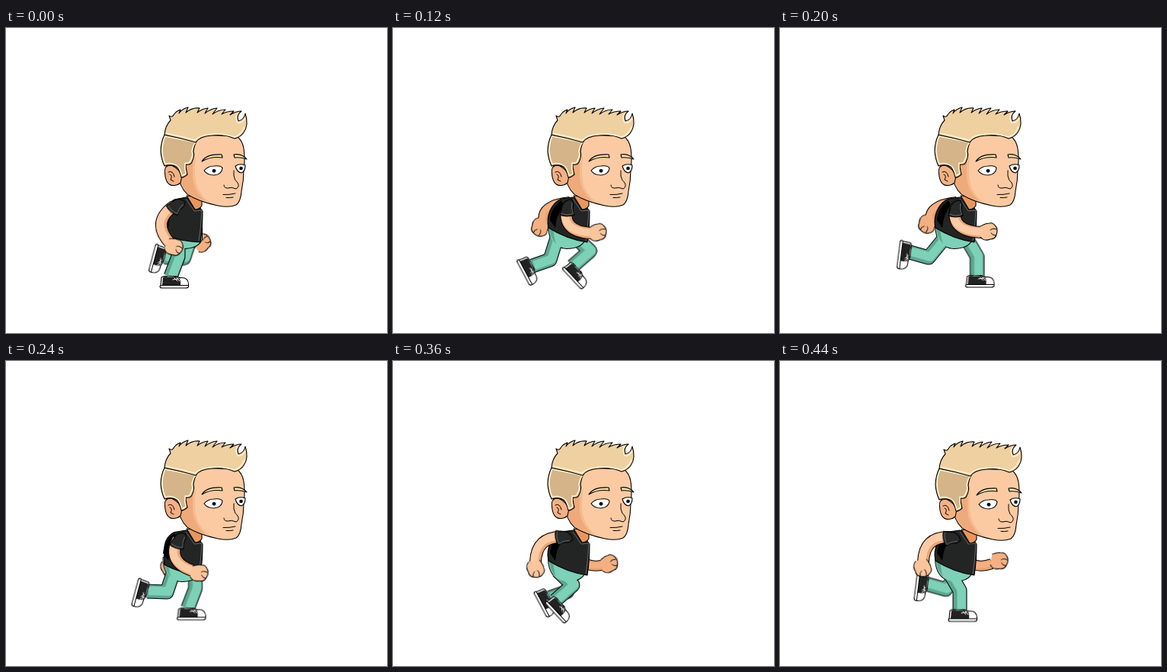
Write an HTML page without scripts that moves like this. It is 500 px wide and 400 px high and loops after 480 ms.

```html
<!DOCTYPE html>
<html lang="en">
<head>
<meta charset="utf-8">
<title>Run cycle</title>
<style>
html, body { margin: 0; width: 100%; height: 100%; overflow: hidden; background: #fff; }
svg { display: block; width: 500px; height: 400px; }
path { stroke-linejoin: round; }
.ink { stroke: #000; stroke-width: 1.1; }
.line { fill: none; stroke: #000; stroke-width: 1; stroke-linecap: round; }
.seam { fill: none; stroke: #6d706f; stroke-width: .9; }
.glow { fill: none; stroke: #fff0d2; stroke-width: 1.6; }

/* Limbs are one animated centre line stroked three times: edge, shade, light */
.leg, .arm { fill: none; }
.leg { stroke-width: 17; stroke: #5da690; }
.arm { stroke-width: 14; stroke: #eda473; }
.leg.edge { stroke-width: 19; stroke: #000; }
.arm.edge { stroke-width: 16; stroke: #000; }
.leg.light { stroke-width: 11.5; stroke: #7dd1b7; transform: translate(2.2px, -.8px); }
.arm.light { stroke-width: 10; stroke: #fbcba6; transform: translate(-1.4px, -.6px); }
.fist { fill: #fbc59c; }
.far .arm { stroke-width: 12; stroke: #eda473; }
.far .arm.edge { stroke-width: 14; stroke: #000; }
.far .arm.light { stroke-width: 7; stroke: #f3b183; }
.far .fist { fill: #f3b183; }

/* Legs share one cycle, half a period apart */
.leg, .shoe { animation: leg .48s step-end infinite; }
.shoe { animation-name: shoe; }
.far .leg, .far .shoe { animation-delay: -.24s; }
.head { animation: bob .48s step-end infinite; }
.arm, .hand, .sleeve, .shirt, .pelvis { animation: arm .48s steps(2) infinite; }
.hand { animation-name: hand; }
.far .arm { animation-name: far-arm; }
.far .hand { animation-name: far-hand; }
.sleeve { animation-name: sleeve; }
.shirt { animation-name: shirt; }
.pelvis { animation-name: pelvis; }

@keyframes leg {
  0%, 100% { d: path("M226 274L226 300L216 326"); }
  8.33% { d: path("M221 276L217 304L206 323"); }
  16.66% { d: path("M215 272L213 298L201 320"); }
  25% { d: path("M216 272L206 304L183 312"); }
  33.33% { d: path("M217 273L200 304L177 304"); }
  41.66% { d: path("M218 273L195 301L170 294"); }
  50% { d: path("M220 276L211 303L185 302"); }
  58.33% { d: path("M217 276L214 309L191 313"); }
  66.66% { d: path("M219 276L222 297L203 311"); }
  75% { d: path("M216 275L236 294L213 314"); }
  83.33% { d: path("M218 276L238 297L228 320"); }
  91.66% { d: path("M219 272L236 301L236 327"); }
}
@keyframes shoe {
  0%, 100% { transform: translate(221px, 333px); }
  8.33% { transform: translate(208px, 330px) rotate(14deg); }
  16.66% { transform: translate(198px, 327.5px) rotate(32deg); }
  25% { transform: translate(178px, 318px) rotate(62deg); }
  33.33% { transform: translate(169px, 308px) rotate(82deg); }
  41.66% { transform: translate(163.5px, 298px) rotate(97deg); }
  50% { transform: translate(177px, 305px) rotate(105deg); }
  58.33% { transform: translate(186px, 318px) rotate(85deg); }
  66.66% { transform: translate(200px, 322.5px) rotate(58deg); }
  75% { transform: translate(218px, 325.5px) rotate(47deg); }
  83.33% { transform: translate(231px, 330px) rotate(18deg); }
  91.66% { transform: translate(240px, 333.5px); }
}
@keyframes arm {
  0%, 100% { d: path("M221 233Q190 254 215 282"); }
  16.66% { d: path("M223 234Q214 267 246 280"); animation-timing-function: step-end; }
  25% { d: path("M229 234Q220 267 260 269"); }
  41.66% { d: path("M231 234Q222 267 266 268"); }
  58.33% { d: path("M220 233Q199 261 226 283"); }
  75% { d: path("M222 231Q188 230 187 264"); }
  91.66% { d: path("M222 231Q189 230 188 264"); animation-timing-function: step-end; }
}
@keyframes hand {
  0%, 100% { transform: translate(220px, 287px) rotate(25deg); }
  16.66% { transform: translate(253px, 281px) rotate(10deg); animation-timing-function: step-end; }
  25% { transform: translate(268px, 268px) rotate(-5deg); }
  41.66% { transform: translate(273px, 267px) rotate(0deg); }
  58.33% { transform: translate(233px, 289px) rotate(25deg); }
  75% { transform: translate(187px, 272px) rotate(80deg); }
  91.66% { transform: translate(187px, 271px) rotate(80deg); animation-timing-function: step-end; }
}
@keyframes far-arm {
  0%, 100% { d: path("M236 236Q232 274 251 283"); }
  16.66% { d: path("M232 230Q194 238 203 262"); animation-timing-function: step-end; }
  25%, 41.66% { d: path("M232 228Q193 232 198 254"); }
  58.33% { d: path("M234 234Q222 262 234 279"); }
  75% { d: path("M240 236Q242 276 278 267"); }
  91.66% { d: path("M240 236Q242 278 278 266"); animation-timing-function: step-end; }
}
@keyframes far-hand {
  0%, 100% { transform: translate(257px, 282px) rotate(-35deg); }
  16.66% { transform: translate(200px, 267px) rotate(100deg); animation-timing-function: step-end; }
  25% { transform: translate(193px, 261px) rotate(115deg); }
  41.66% { transform: translate(193px, 257px) rotate(115deg); }
  58.33% { transform: translate(236px, 284px) rotate(30deg); }
  75% { transform: translate(283px, 266px) rotate(-15deg); }
  91.66% { transform: translate(287px, 262px) rotate(10deg); animation-timing-function: step-end; }
}
@keyframes sleeve {
  0%, 100% { transform: translate(227px, 229px) rotate(40deg); }
  16.66% { transform: translate(226px, 230px) rotate(6deg); animation-timing-function: step-end; }
  25% { transform: translate(229px, 231px) rotate(0deg); }
  41.66% { transform: translate(231px, 232px) rotate(0deg); }
  58.33% { transform: translate(226px, 229px) rotate(36deg); }
  75% { transform: translate(229px, 230px) rotate(80deg); }
  91.66% { transform: translate(230px, 231px) rotate(80deg); animation-timing-function: step-end; }
}
@keyframes shirt {
  0%, 58.33%, 100% { d: path("M221 225C212 230 210 238 213 252L211 272Q230 280 255 281Q258 262 258 240L246 225L236 222Z"); }
  16.66%, 25%, 41.66%, 75%, 91.66% { d: path("M221 224C210 229 203 241 203 255L204 262Q228 277 255 281Q258 262 258 240L246 225L236 222Z"); }
}
@keyframes pelvis {
  0%, 58.33%, 100% { transform: translate(5px, 0); }
  16.66%, 25%, 41.66%, 75%, 91.66% { transform: none; }
}
@keyframes bob {
  0%, 25%, 100% { transform: none; }
  8.33% { transform: translate(.7px, -.5px); }
  16.66% { transform: translate(1px, -1px); }
  91.66% { transform: translate(1px, 1px); }
}
</style>
</head>
<body>
<svg viewBox="0 0 500 400">
  <defs>
    <g id="shoe">
      <path class="ink" fill="#fff" d="M-18 4L-17 -6Q-13 -9 -8 -7L2 -7.500Q6 -5 9 -5.500Q18 -6 18.500 3V6Q18 8 15 8H-16Q-19 8 -19 6Z"/>
      <path fill="#222" d="M-16 4L-15 -6Q-12 -8 -8 -6L2 -7Q5 -4 7 -4.500Q9 0 8 4Z"/>
      <path class="line" d="M-18 4.500H18.500"/>
      <path class="line" style="stroke:#fff" d="M0 -5L4 -1M3 -5L7 -1M-2 -3L5 -4"/>
    </g>
    <g id="fist">
      <path class="ink" d="M-10 -7C-6 -9 -3 -11 2 -11C5 -12 8 -10 10 -7C13 -4 12 1 11 4C10 8 7 10 3 10C-2 12 -7 11 -10 7"/>
      <path class="line" d="M11 -3Q6 -5 3 -2M10 5Q6 5 4 2"/>
    </g>
    <path id="pelvis" d="M204 258C204 276 212 288 228 289C240 289 249 285 252 277V262Z"/>
  </defs>

  <g class="far">
    <path class="arm edge"/><path class="arm"/><path class="arm light"/>
    <g class="hand fist"><use href="#fist"/></g>
    <g transform="translate(22.5 -1.5)">
      <path class="leg edge"/><path class="leg"/><path class="leg light"/>
      <g class="shoe"><use href="#shoe"/></g>
    </g>
  </g>

  <g class="pelvis"><use href="#pelvis" fill="#7dd1b7" stroke="#000" stroke-width="2"/></g>
  <path class="leg edge"/><path class="leg"/><path class="leg light"/>
  <g class="shoe"><use href="#shoe"/></g>
  <g class="pelvis">
    <use href="#pelvis" fill="#7dd1b7"/>
    <path fill="#5da690" d="M204.500 260Q206 275 214 283Q210 272 211 262Z"/>
  </g>

  <path class="shirt ink" fill="#222524"/>
  <path fill="#000" d="M221 226Q208 234 206 252L213 262Q214 246 224 232Z"/>
  <path class="seam" d="M236 224L247 240L257 239Q256 262 253 279"/>

  <path class="arm edge"/><path class="arm"/><path class="arm light"/>
  <g class="hand fist"><use href="#fist"/></g>
  <g class="sleeve">
    <path class="ink" fill="#262928" d="M6 -6Q-5 -6 -7 3L-10 14Q-1 18 9 14Q6 6 8 0Z"/>
    <path class="seam" d="M-8.500 12Q-1 15.500 7.500 12.500Q4.500 5 6 -2"/>
  </g>

  <g class="head">
    <path class="ink" fill="#e9965c" d="M237 220L248 238Q254 238 257 233V222Z"/>
    <path class="ink" fill="#fbcaa3" d="M226 190Q227 208 238 218C250 226 264 230 278 233Q293 236 302 232Q308 228 309 214Q312 200 312 186Q314 172 312 158Q310 147 303 142L255 140L240 165Z"/>
    <path fill="#eeaa7a" d="M226.500 190Q228 208 239 218Q249 224 262 227Q249 213 248 198L247 176L232 180Z"/>
    <path fill="#f5bb90" d="M245 177L250 166Q246 185 249 200Q252 218 268 229L260 226Q246 212 245 196Z"/>
    <path class="ink" fill="#f3b184" d="M226 186C216 176 207 180 208.500 190C209 201 213 207 221 206.500Q226 206 229 203L231 194Z"/>
    <path class="line" d="M213 189Q219 186 221 195M215 192Q219 193 216 199L220 201"/>

    <path class="ink" fill="#d4b488" d="M208 140Q203 150 203 162Q204 173 208 181Q219 178 225 183Q228 187 230 196Q234 196 238 192Q236 184 236 179Q242 180 244 176Q248 168 246 162Q247 154 250 149Z"/>
    <path class="glow" d="M209 142Q205 150 205 162Q206 172 209 178Q219 176 226 182Q229 186 231 194L236 191Q234 184 235 177Q241 178 242 174Q246 167 244 162Q245 154 249 150Z"/>
    <path class="ink" fill="#efd0a1" d="M208 140Q209 128 216 121L214 115Q218 118 220 114Q223 109 229 107L227 112Q231 106 239 104L236 111Q244 104 254 105L251 111Q257 106 265 105L261 112Q268 106 277 105L271 113Q279 107 288 107L283 113Q290 109 299 109L294 114Q302 109 309 109Q302 114 305 122Q312 121 314 112Q319 127 312 137Q308 143 300 145Q286 139 270 141Q254 142 249 150Q228 144 208 140Z"/>
    <path class="glow" d="M210 138Q229 142 248 147Q255 140 270 139Q288 138 300 143Q309 140 313 129M304 112Q300 117 304 124Q311 125 314 118"/>

    <path class="ink" fill="#fff" d="M260 187Q265 181 273 181Q283 180 284 184Q283 192 273 193Q264 193 260 187Z"/>
    <path class="ink" fill="#fff" d="M301 181Q307 177 314 180Q314 188 309 190Q303 189 301 181Z"/>
    <circle cx="273" cy="187.300" r="2.400"/>
    <circle cx="308.500" cy="184" r="2.300"/>
    <path class="ink" fill="#f5e3ad" d="M257 175Q263 165 283 166L284 170Q269 168 257 175Z"/>
    <path class="ink" fill="#f5e3ad" d="M299 166Q309 164 316 172Q307 169 300 170Z"/>
    <path class="line" d="M299 187V194Q300 200 304 203Q307 208 302 211Q296 208 291 210Q286 210 286 206M285 218.500Q293 219 301 217M289 222.500Q293 223 298 222"/>
  </g>
</svg>
</body>
</html>
```
